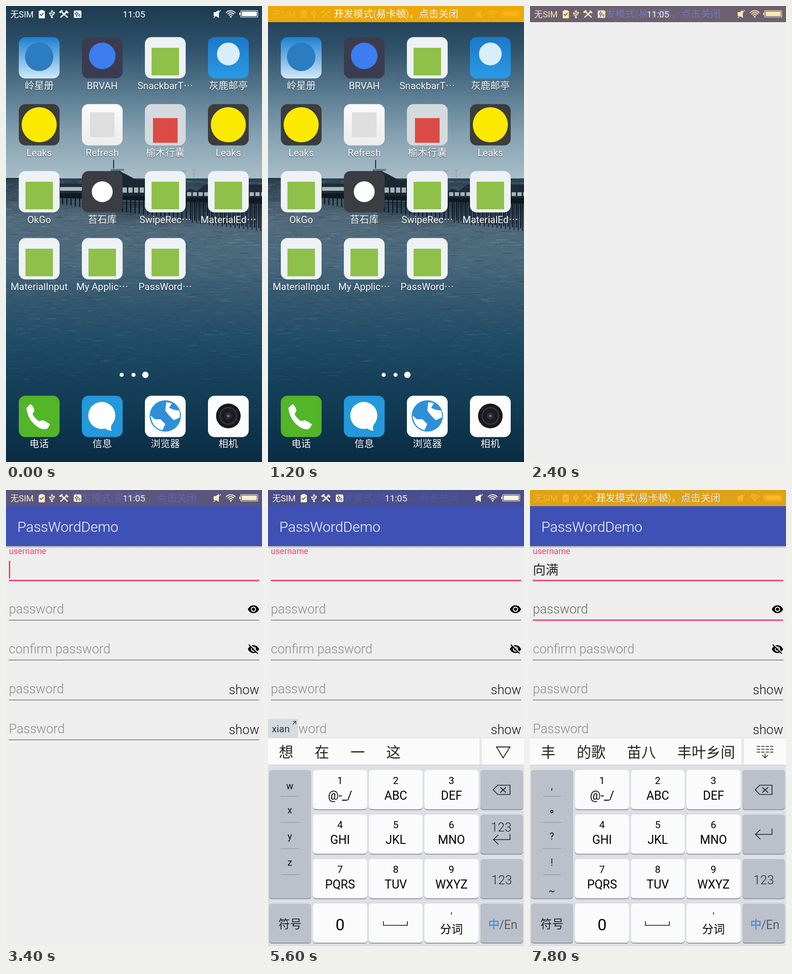
Write an HTML page with a canvas that moves like this. It is 540 px wide and 960 px high and loops after 8000 ms.

```html
<!DOCTYPE html>
<html lang="zh">
<head>
<meta charset="utf-8">
<style>
  html, body { margin: 0; width: 100%; height: 100%; overflow: hidden; background: #eee; }
  canvas { display: block; width: 540px; height: 960px; }
  #notice {
    position: absolute; top: 0; left: 0; width: 540px; height: 34px;
    background: rgb(250, 176, 5); color: #fff; text-align: center; white-space: nowrap;
    font: 300 20.8px/34px Roboto, "Noto Sans CJK SC", "Noto Sans CJK", sans-serif;
  }
</style>
</head>
<body>
<canvas id="stage" width="540" height="960"></canvas>
<div id="notice">开发模式(易卡顿)，点击关闭</div>
<script>
const ctx = document.getElementById('stage').getContext('2d');
const notice = document.getElementById('notice');
const LOOP = 8000, STEP = 200;
const PINK = '#f0447f', INK = '#222';
const clamp = v => Math.max(0, Math.min(1, v));
const easeOut = p => 1 - (1 - p) ** 3;

// ---- drawing helpers ----
function rect(x, y, w, h, fill, radius = 0) {
  ctx.fillStyle = fill;
  ctx.beginPath();
  ctx.roundRect(x, y, w, h, radius);
  ctx.fill();
}
function circle(x, y, r, fill) {
  ctx.fillStyle = fill;
  ctx.beginPath();
  ctx.arc(x, y, r, 0, 7);
  ctx.fill();
}
function ring(x, y, r, color, width, from = 0, to = 7) {
  ctx.strokeStyle = color;
  ctx.lineWidth = width;
  ctx.beginPath();
  ctx.arc(x, y, r, from, to);
  ctx.stroke();
}
function fillPath(d, fill) {
  ctx.fillStyle = fill;
  ctx.fill(new Path2D(d));
}
function stroke(d, color, width) {
  ctx.strokeStyle = color;
  ctx.lineWidth = width;
  ctx.stroke(new Path2D(d));
}
function setFont(size, weight = 300) {
  ctx.font = `${weight} ${size}px Roboto, "Noto Sans CJK SC", "Noto Sans CJK", sans-serif`;
}
// y is the middle of the capitals
function text(str, x, y, size, fill, align = 'left', weight = 300) {
  setFont(size, weight);
  ctx.textAlign = align;
  ctx.fillStyle = fill;
  ctx.fillText(str, x, y + size * 0.36);
  return ctx.measureText(str).width;
}
function vertical(y0, y1, colors) {
  const g = ctx.createLinearGradient(0, y0, 0, y1);
  colors.forEach((c, i) => g.addColorStop(i / (colors.length - 1), c));
  return g;
}

// ---- home screen ----
function wallpaper() {
  rect(0, 0, 540, 364, vertical(0, 364, ['#1c3a50', '#2f536b', '#587a90', '#86a2b2', '#a9bec8']));
  rect(0, 363, 540, 597, vertical(363, 960,
    ['#2b4051', '#526a7b', '#4a687c', '#33586f', '#204c66', '#164059', '#0f3750', '#0a2c43']));
  let seed = 7;
  const random = () => (seed = seed * 16807 % 2147483647) / 2147483647;
  for (let i = 0; i < 2200; i++) {
    const depth = random() ** 1.4, shade = random() < 0.5 ? '165,190,205' : '8,30,46';
    rect(random() * 560 - 20, 368 + depth * 420, 5 + random() * 20, 1 + random() * 1.2,
      `rgba(${shade},${(0.06 + random() * 0.18) * (1 - depth * 0.7)})`);
  }
  // pier: reflection, posts, deck, pavilions, turret
  rect(230, 412, 310, 58, vertical(412, 470, ['rgba(12,26,38,.55)', 'rgba(12,26,38,0)']));
  for (let x = 118; x < 540; x += 9) {
    const depth = 18 + (x - 118) * 0.12;
    rect(x, 400, 2.5, depth, '#0f1b25');
    if (x > 380) rect(x + 4, 412, 2, depth - 6, '#142431');
  }
  rect(0, 362, 115, 3, '#22333f');
  fillPath('M112 394H300L540 402V416L300 410L112 404Z', '#0f1922');
  rect(113, 374, 48, 20, '#1f2d38');
  rect(114, 381, 46, 8, '#a9b8c0');
  fillPath('M205 376L218 352H249L275 366H340L352 400H205Z', '#1b2833');
  fillPath('M216 354Q226 334 250 354Z', '#1c2a36');
  rect(221, 343, 28, 4, '#66798a');
  stroke('M227 324V342', '#1c2a36', 2);
  for (let x = 246; x < 340; x += 12) rect(x, 382, 9, 11, '#a4b2ba');
  fillPath('M376 392L388 384L402 390L420 376H540V404H376Z', '#1e2b36');
  for (let x = 382; x < 540; x += 12) rect(x, 392, 9, 8, '#a4b2ba');
  stroke('M376 362V349L371 345M376 349L381 346M397 362V347L392 344M397 347L402 343', '#7e96a4', 1);
}

const ANDROID = { tile: ['#eef2f4'], mark: ['#8fc04a', 'square', 58, 8] };
const LEAKS = { tile: ['#3c3c3c'], mark: ['#fbea00', 'circle', 74, 0] };
const APPS = [
  ['岭星册', { tile: ['#1c7fd0', '#d3eaf8'], mark: ['#2b7cc0', 'circle', 60, -2] }],
  ['BRVAH', { tile: ['#3b3b50'], mark: ['#3c7df0', 'circle', 56, -4] }],
  ['SnackbarT⋯', ANDROID],
  ['灰鹿邮亭', { tile: ['#1b78c8', '#2a9be6'], mark: ['#d8eefb', 'circle', 48, -8] }],
  ['Leaks', LEAKS],
  ['Refresh', { tile: ['#fbfbfb', '#ececec'], mark: ['#dedede', 'square', 52, 0] }],
  ['榆木行囊', { tile: ['#d4dade'], mark: ['#db4b45', 'square', 52, 12] }],
  ['Leaks', LEAKS],
  ['OkGo', ANDROID],
  ['苔石库', { tile: ['#3b3d43'], mark: ['#ffffff', 'circle', 44, 0] }],
  ['SwipeRec⋯', ANDROID],
  ['MaterialEd⋯', ANDROID],
  ['MaterialInput', ANDROID],
  ['My Applic⋯', ANDROID],
  ['PassWord⋯', ANDROID],
];

function appTile(cx, top, colors) {
  rect(cx - 43, top, 86, 87, colors.length > 1 ? vertical(top, top + 87, colors) : colors[0], 14);
}
function appLabel(name, cx, y) {
  ctx.save();
  ctx.shadowColor = 'rgba(0,0,0,.6)';
  ctx.shadowBlur = 2;
  ctx.shadowOffsetY = 1;
  text(name, cx, y, 20.4, '#fff', 'center', 400);
  ctx.restore();
}
function dock() {
  [['电话', '#53b528'], ['信息', '#2399dc'], ['浏览器', '#fdfdfd'], ['相机', '#fdfdfd']].forEach(([name, color], i) => {
    appTile(70 + 133 * i, 820.5, [color]);
    appLabel(name, 70 + 133 * i, 922);
  });
  fillPath('M43 846L52 838Q58 842 60 852L56 859Q60 868 70 874L78 872Q90 878 93 881L87 890Q78 893 68 887Q46 873 43 846Z', '#fff');
  circle(202, 862, 28.5, '#fff');
  fillPath('M206 885L224 880Q219 887 223 894Q211 894 206 885Z', '#fff');
  circle(336, 863, 33, '#2f8fd8');
  fillPath('M305 862L314 870L326 870L336 880L330 893Q308 888 305 862Z', '#fff');
  fillPath('M338 834L350 836L344 846L354 850L366 852L367 866L354 872L344 862L336 852Z', '#fff');
  circle(469, 863, 26, '#16181a');
  circle(469, 863, 19, '#34373a');
  circle(469, 863, 16, '#1a1c1f');
  circle(469, 863, 7, '#2d3136');
  circle(469, 863, 2.5, '#6a7385');
}
function home() {
  wallpaper();
  APPS.forEach(([name, { tile, mark: [color, shape, size, dy] }], i) => {
    const cx = 70 + 133 * (i % 4), top = 65.5 + 141 * Math.floor(i / 4), cy = top + 43.5 + dy;
    appTile(cx, top, tile);
    if (shape === 'circle') circle(cx, cy, size / 2, color);
    else rect(cx - size / 2, cy - size / 2, size, size, color);
    appLabel(name, cx, top + 102);
  });
  circle(244, 776.5, 4.3, '#fff');
  circle(269, 776.5, 4.3, '#fff');
  circle(294, 776.5, 6.7, '#fff');
  dock();
}

// ---- status bar ----
function usb(x, y, color, s) {
  ctx.save();
  ctx.translate(x, y);
  ctx.scale(s, s);
  stroke('M0 -7V8M-4.5 -2V1Q-4.5 3 0 5M4.5 -3V0Q4.5 2 0 3', color, 1.7);
  fillPath('M0 -10L3 -5.5H-3ZM-6.5 -4H-2.5V0H-6.5ZM2.5 -5H6.5V-1H2.5Z', color);
  circle(0, 7.5, 2.2, color);
  ctx.restore();
}
function statusIcons() {
  const W = '#fff', DARK = '#3a4a66';
  text('无SIM', 9, 17.5, 18, W, 'left', 400);
  rect(69, 10, 13, 16, W, 1.5);
  rect(72, 8.5, 7, 3, W, 1);
  stroke('M71.5 17L74.5 20L79.5 14.5', DARK, 1.8);
  usb(97, 17, W, 0.9);
  stroke('M117 12L130 24M115 24L129 11', W, 3);
  stroke('M113 14L119 9.5M126 10L131 15', W, 3.5);
  rect(143, 9.5, 16, 15.5, W, 2.5);
  usb(149, 17, DARK, 0.6);
  ring(154.5, 20, 1.8, DARK, 1.3);
  text('11:05', 270, 17.5, 19, W, 'center', 400);
  fillPath('M438 13H442L449 8.5V25L442 21H438Z', W);
  stroke('M438 25L453 9', W, 1.5);
  [5, 9, 13].forEach(r => ring(474, 23, r, W, 1.9, -Math.PI * 0.78, -Math.PI * 0.22));
  circle(474, 22.5, 2, W);
  stroke('M497 9.5H529Q531 9.5 531 11.5V21.5Q531 23.5 529 23.5H497Q495 23.5 495 21.5V11.5Q495 9.5 497 9.5Z', W, 1.2);
  rect(497, 11.5, 32, 10, W, 1);
  rect(492, 14, 2, 5, W);
}
const noticeOpacity = t => (1 + Math.cos((t - 1450) / 3000 * 2 * Math.PI)) / 2;

// ---- form ----
function underline(y, active) {
  if (active) rect(6, y - 1.5, 528, 3, PINK);
  else rect(6, y - 0.8, 528, 1.6, '#747474');
}
function eye(y, crossed) {
  ctx.save();
  ctx.translate(522, y);
  fillPath('M-12 0Q-8 -8.2 0 -8.2T12 0Q8 8.2 0 8.2T-12 0Z', '#000');
  circle(0, 0, 5.5, '#eee');
  circle(0, 0, 3.3, '#000');
  if (crossed) {
    stroke('M-8 -10L11 9', '#eee', 2.4);
    stroke('M-10 -9.5L9 9.5', '#000', 2.1);
  }
  ctx.restore();
}
function form(t) {
  rect(0, 0, 540, 960, '#eee');
  rect(0, 0, 540, 34, '#303f9f');
  if (t < 2600) return;
  rect(0, 118, 540, 5, vertical(118, 123, ['rgba(0,0,0,.28)', 'rgba(0,0,0,0)']));
  rect(0, 34, 540, 84, '#3f51b5');
  text('PassWordDemo', 24, 77, 30, '#fff');

  const committed = t >= 7000, passwordActive = t >= 7800;
  text('username', 6, 128.5, 17.8, PINK, 'left', 400);
  const entered = committed ? text('向满', 6, 168, 27, INK) : 0;
  if (t % 1000 < 500 && !passwordActive) rect(6 + entered, 149, 3, 37, PINK);
  underline(190.5, true);

  ['password', 'confirm password', 'password', 'Password'].forEach((hint, i) => {
    const y = 250.5 + 84 * i, active = i === 0 && passwordActive;
    text(hint, 6, y, 27, active ? '#666' : '#8a8a8a');
    underline(y + 23.5, active);
    if (i < 2) eye(y + 0.5, i === 1);
    else text('show', 534, y + 2, 27, '#111', 'right');
  });
}

// ---- keyboard ----
const COLUMNS = [[2, 89], [95, 114], [213, 113], [330, 114], [448, 90]];
const rowTop = r => 589.5 + 93.7 * r;
const KEYS = ['@-_/', 'ABC', 'DEF', 'GHI', 'JKL', 'MNO', 'PQRS', 'TUV', 'WXYZ'];
const GREY = '#bbc0cb', WHITE = '#fbfbfc';

// draws a key and returns its centre
function key(col, row, fill, rows = 1) {
  const [x, w] = COLUMNS[col], y = rowTop(row), h = 83 + 93.7 * (rows - 1);
  rect(x, y + 1.5, w, h, '#92979f', 6);
  rect(x, y, w, h - 0.5, fill, 6);
  return x + w / 2;
}
function hideIcon(x) {
  for (let i = 0; i < 12; i++) rect(x - 17.5 + 9.3 * (i % 4), 539 + 6 * Math.floor(i / 4), 7, 1.5, INK);
  stroke(`M${x} 555V564M${x - 6} 558L${x} 564L${x + 6} 558`, INK, 1.5);
}
function toolbar() {
  [92, 210, 328, 446].forEach(x => rect(x, 533, 1, 37, '#d4d4d6'));
  ring(46.5, 551.5, 12.7, INK, 1.8);
  circle(42, 548, 1.8, INK);
  circle(51, 548, 1.8, INK);
  stroke('M39.5 553.5Q46.5 562 53.5 553.5', INK, 1.6);
  text('设置', 151, 552, 26, INK, 'center');
  stroke('M264 542.5Q264 536.5 269.700 536.5T275.5 542.5V552.5Q275.5 558.5 269.700 558.5T264 552.5Z', INK, 1.8);
  stroke('M258.5 549Q258.5 562 269.700 562T281 549M269.700 562V567M263 567H276.5', INK, 1.7);
  text('切换', 387, 552, 26, INK, 'center');
  hideIcon(493);
}
function candidates(words, composing) {
  let x = 23;
  words.forEach(word => { x += text(word, x, 552, 30.5, INK) + 45; });
  rect(446, 523, 5, 55, 'rgba(0,0,0,.08)');
  rect(451, 523, 89, 55, WHITE);
  if (composing) stroke('M482 541H510.5L496 564Z', INK, 1.8);
  else hideIcon(496);
}
function composition(str) {
  setFont(20.6, 400);
  const w = ctx.measureText(str).width + 25;
  rect(0, 482, w, 40, '#d6dbe1');
  text(str, 8, 503, 20.6, '#333', 'left', 400);
  stroke(`M${w - 11} 494L${w - 4} 487M${w - 10} 487H${w - 4}V493`, INK, 1.2);
}
function sideKey(items) {
  key(0, 0, GREY, 3);
  const middles = [623, 674, 729, 784, 844];
  items.forEach((s, i) => {
    if (s === '。') ring(46, 677, 2.4, '#000', 1.5);
    else text(s, 46, middles[i], 20, '#111', 'center', 400);
    if (i < 4) rect(27, 644 + 55 * i, 39, 1.6, '#999ea8');
  });
}
function keyboard(t) {
  const letters = t >= 5000 && t < 7000 ? Math.min(8, Math.floor((t - 5000) / 200) + 1) : 0;
  const typed = ["x", "xi", "xia", "xian", "xiang", "xiang'm", "xiang'ma", "xiang'man"][letters - 1];
  rect(0, 522, 540, 438, '#dce0e5');
  rect(0, 522, 540, 56, WHITE);
  rect(0, 521.5, 540, 1, '#cfd1d4');
  rect(0, 578, 540, 1, '#cdd1d6');

  if (typed) {
    composition(typed);
    candidates(letters < 5 ? ['想', '在', '一', '这'] : letters < 8 ? ['想', '向', '像', '张'] : ['向满', '想满', '向慢', '项满'], true);
  } else if (t >= 7000) candidates(['丰', '的歌', '苗八', '丰叶乡间'], false);
  else toolbar();

  sideKey(!typed ? [',', '。', '?', '!', '~']
    : letters < 5 ? ['w', 'x', 'y', 'z', '']
    : ['xiang', 'zhang', 'xian', 'xiao', 'zhan']);

  KEYS.forEach((label, i) => {
    const row = Math.floor(i / 3), cx = key(1 + i % 3, row, WHITE), y = rowTop(row);
    text(i + 1, cx, y + 21.5, 21, '#000', 'center', 400);
    text(label, cx, y + 53, 25, '#000', 'center', 400);
  });
  text('符号', key(0, 3, GREY), 914.5, 24.5, INK, 'center');
  text('0', key(1, 3, WHITE), 914.5, 34, '#000', 'center', 400);
  key(2, 3, WHITE);
  stroke('M243.5 908V916.5H294V908', '#111', 1.6);
  const split = key(3, 3, WHITE);
  text("'", split, 896, 21, '#000', 'center', 400);
  text('分词', split, 924, 24, '#000', 'center', 500);

  key(4, 0, GREY);
  stroke('M475 631L484.5 621.5H510.5V641H484.5ZM490 626L502 637M502 626L490 637', INK, 1.7);
  key(4, 1, GREY);
  const dy = typed ? 11 : 0;
  if (typed) text('123', 492, 710, 26, INK, 'center');
  stroke(`M510.5 ${713 + dy}V${725 + dy}H476M486 ${715 + dy}L475.5 ${725 + dy}L486 ${735 + dy}`, INK, 1.6);
  text('123', key(4, 2, GREY), 821, 26, INK, 'center');
  key(4, 3, GREY);
  text('中', 464.5, 914.5, 24, '#2585e6', 'left', 400);
  text('/En', 488, 914.5, 25, '#333');
}

// ---- timeline ----
function render(t) {
  const opening = clamp((t - 2000) / 400);
  if (opening < 1) home();
  if (opening > 0) {
    const scale = easeOut(opening);
    ctx.save();
    ctx.translate(336 * (1 - scale), 532 * (1 - scale));
    ctx.scale(scale, scale);
    form(t);
    ctx.restore();
  }
  if (t >= 4000) {
    ctx.save();
    ctx.translate(0, 438 * (1 - easeOut(clamp((t - 3900) / 500))));
    keyboard(t);
    ctx.restore();
  }
  statusIcons();
  notice.style.opacity = noticeOpacity(t);
}

const start = performance.now();
let shown = -1;
function tick() {
  const t = Math.floor((performance.now() - start) % LOOP / STEP) * STEP;
  if (t !== shown) render(shown = t);
  requestAnimationFrame(tick);
}
tick();
</script>
</body>
</html>
```
